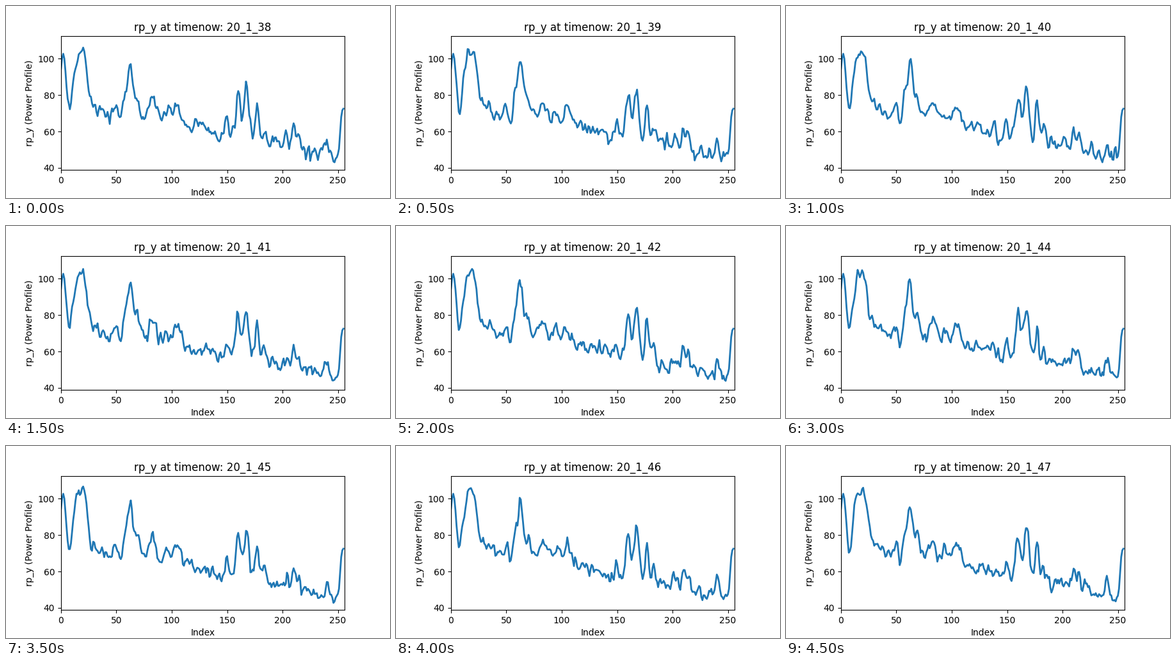
A matplotlib script for the animation above (5000 ms loop, 600 by 300 pixels).

```python
import numpy as np
import matplotlib.pyplot as plt
from matplotlib.animation import FuncAnimation

W, H, DPI = 600, 300, 100
FRAMES, STEP = 10, 500
N = 256
Y_MIN, Y_MAX = 38.885, 112.485

# Peaks and dips that stay in place: centre, height, width
PEAKS = [
    (2, 25, 2.2), (7.5, -7, 1.5), (15.5, 25, 3.5), (21.5, 20, 2.6),
    (43, -5, 4), (50, 5, 1.6), (53.5, -6, 1.6), (57.5, 10, 1.6),
    (62.5, 29, 2.2), (69, 10, 2.2), (83, 10, 3), (95, 6, 2.5),
    (105, 10, 3), (143, -3, 2.5), (149.5, 8, 1.4), (160, 23, 2),
    (167.5, 28, 2.2), (177, 21, 1.5), (183, 8, 1.5), (203, 4, 2),
    (210, 11, 1.6), (214.5, 8, 1.3), (240.5, 8, 1.5),
]

index = np.arange(N)
base = 78 - 0.13 * index + 28 / (1 + np.exp(1.5 * (252 - index)))
for centre, height, width in PEAKS:
    base += height * np.exp(-((index - centre) / width) ** 2 / 2)

# The first and last samples hardly vary
calm = np.clip((index - 3) / 4, 0, 1) * np.clip((251 - index) / 3, 0, 1)


def power(i):
    rng = np.random.default_rng(40 + i)
    noise = np.convolve(rng.normal(0, 3, N), [0.2, 0.6, 0.2], "same")
    return np.clip(base + noise * calm, Y_MIN, Y_MAX)


fig = plt.figure(figsize=(W / DPI, H / DPI), dpi=DPI)
ax = fig.add_axes([85.96 / W, 44 / H, 443 / W, 209 / H])
line, = ax.plot([], [], color="tab:blue", linewidth=2)
ax.set_xlim(0, N)
ax.set_ylim(Y_MIN, Y_MAX)
ax.set_xlabel("Index")
ax.set_ylabel("rp_y (Power Profile)")
title = ax.set_title("")


def draw(i):
    line.set_data(index, power(i))
    title.set_text(f"rp_y at timenow: 20_1_{38 + i}")
    return line, title


anim = FuncAnimation(fig, draw, frames=FRAMES, interval=STEP, repeat=True, repeat_delay=0)
plt.show()
```
